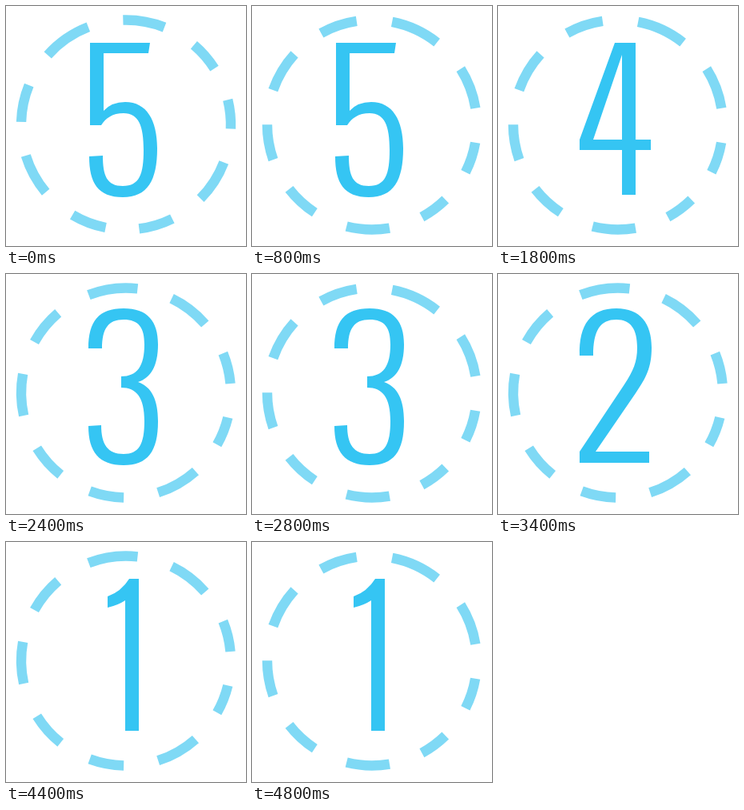
An HTML page for the animation above (5000 ms loop, 300 px wide and 300 px high).

```html
<!DOCTYPE html>
<html lang="en">
<head>
<meta charset="utf-8">
<title>Countdown</title>
<style>
  html, body { margin: 0; width: 100%; height: 100%; overflow: hidden; background: #fff; }
  svg { display: block; width: 100vw; height: 100vh; }
</style>
</head>
<body>
<svg viewBox="0 0 300 300" role="img" aria-label="Countdown from 5 to 1">
  <g id="ring" fill="none" stroke="#7fd9f5" stroke-width="12.4"></g>
  <path id="digit" fill="#35c5f3" fill-rule="evenodd"/>
</svg>
<script>
const CX = 150, CY = 148.5, R = 131;
const STEP = 200, SECOND = 1000, LOOP = 5000;

// Start and end of each dash, in degrees clockwise from the top
const dashes = [
  [-1.6, 21.5], [40.4, 57.5], [76.2, 92.2], [111, 134.7], [153.8, 172.8],
  [191.2, 210.7], [230, 252.9], [271.6, 292.2], [311.7, 338.9]
];

// Condensed numerals, 5 down to 1
const digits = [
  "M105 46H180L178 59H122V131Q132 120 149 120C176 120 189 143 189 178C189 218 177 239 146 239C115 239 104 221 104 188L121 187C121 212 126 225 146 225C167 225 172 210 172 180C172 150 166 134 147 134C133 134 125 140 119 149H105Z",
  "M146 46H172V167H191V180H172V236H155V180H102V167ZM155 61V167H119Z",
  "M103 93C103 59 116 43 147 43C177 43 190 59 190 88C190 115 181 130 165 135C182 141 190 157 190 184C190 222 177 239 147 239C116 239 103 222 103 190L119 189C119 213 127 225 147 225C166 225 173 213 173 184C173 154 163 142 144 142V128C164 128 173 115 173 88C173 67 166 57 147 57C128 57 120 68 120 93Z",
  "M102 102C101 63 116 43 148 43C178 43 192 62 192 92C192 117 185 130 172 149L122 222H189V236H102V222L158 138C169 121 174 110 174 92C174 69 166 57 148 57C128 57 119 70 119 102Z",
  "M154 46H166V236H149V73Q140 79 127 82V68Q144 62 154 46Z"
];

const ring = document.getElementById("ring");
const digit = document.getElementById("digit");

function point(deg) {
  const a = deg * Math.PI / 180;
  return `${CX + R * Math.sin(a)} ${CY - R * Math.cos(a)}`;
}

ring.innerHTML = dashes.map(([from, to]) =>
  `<path d="M${point(from)}A${R} ${R} 0 0 1 ${point(to)}"/>`).join("");

function draw(now) {
  const t = now % LOOP;
  const step = Math.floor(t % SECOND / STEP);
  // The ring gains a little speed within each second
  const turn = 12.6 * step + 0.56 * step * step;
  ring.setAttribute("transform", `rotate(${turn} ${CX} ${CY})`);
  digit.setAttribute("d", digits[Math.floor(t / SECOND)]);
}

let start;
function frame(now) {
  start ??= now;
  draw(now - start);
  requestAnimationFrame(frame);
}
draw(0);
requestAnimationFrame(frame);
</script>
</body>
</html>
```
